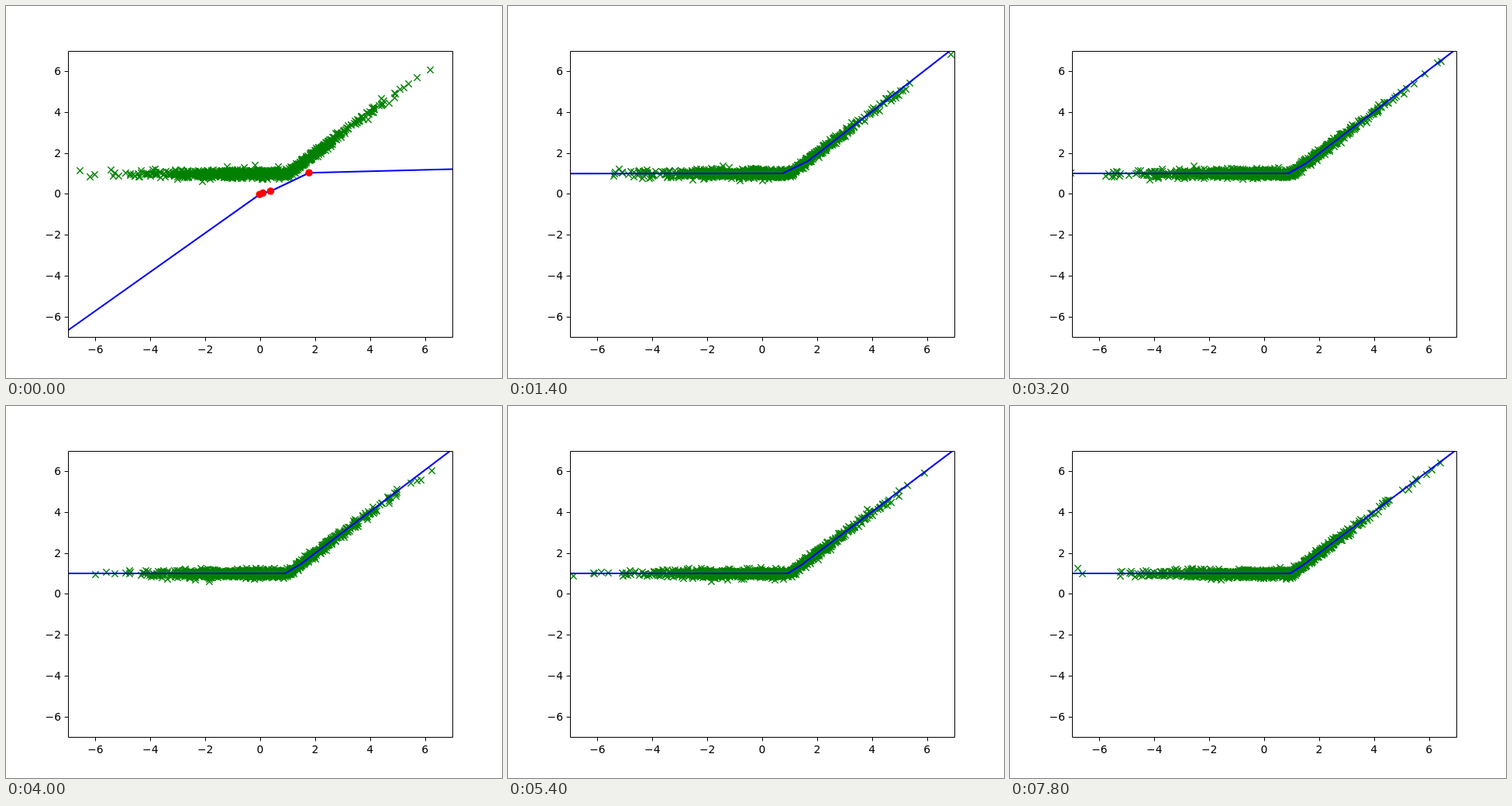
Write an HTML page with a canvas that moves like this. It is 640 px wide and 480 px high and loops after 8000 ms.

```html
<!DOCTYPE html>
<html lang="en">
<head>
<meta charset="utf-8">
<title>Piecewise linear fit</title>
<style>
  html, body { margin: 0; width: 100%; height: 100%; overflow: hidden; background: #fff; }
  canvas, svg { position: absolute; left: 0; top: 0; width: 640px; height: 480px; }
  text { font: 13.89px "DejaVu Sans", sans-serif; }
  path { stroke: #000; stroke-width: 1; fill: none; }
</style>
</head>
<body>
<canvas id="plot" width="640" height="480"></canvas>
<svg id="axes" viewBox="0 0 640 480"></svg>
<script>
const STEP = 200, STEPS = 40, SAMPLES = 1000;
const sx = x => 328 + x * 35.43;
const sy = y => 242.4 - y * 26.4;
const snap = v => Math.round(v) + 0.5;
const ctx = document.getElementById('plot').getContext('2d');

// Vertices of the untrained fit
const START = [[-7, -6.67], [-0.02, -0.03], [0.1, 0.04], [0.38, 0.13], [1.78, 1.03], [7, 1.21]];

// Seeded standard normal numbers
function normalSource(seed) {
  let s = seed;
  const uniform = () => {
    s = (s + 0x6D2B79F5) | 0;
    let t = Math.imul(s ^ (s >>> 15), 1 | s);
    t = (t + Math.imul(t ^ (t >>> 7), 61 | t)) ^ t;
    return ((t ^ (t >>> 14)) >>> 0) / 4294967296;
  };
  return () => Math.sqrt(-2 * Math.log(1 - uniform())) * Math.cos(2 * Math.PI * uniform());
}

// Noisy samples of max(1, x)
function samples(step) {
  const normal = normalSource(step * 7919 + 17);
  return Array.from({ length: SAMPLES }, () => {
    const x = 2 * normal();
    return [x, Math.max(1, x) + 0.1 * normal()];
  });
}

// The fit settles fast at first, then its two bends slowly close in on x = 1
function fit(step) {
  const fast = 0.4 ** step;
  const slow = Math.exp((7 - step) / 9);
  const bend = 1.42 + 0.26 * slow;
  const settled = [
    [-7, 1], [0, 1], [0.1, 1],
    [0.95 - 0.2 * slow, 1],
    [bend, bend - 0.01 - 0.06 * slow],
    [7, 7.04 + 0.13 * slow]
  ];
  return settled.map((p, i) => p.map((v, j) => v + (START[i][j] - v) * fast));
}

function drawCross([x, y]) {
  const cx = snap(sx(x)), cy = snap(sy(y)), r = 4.17;
  ctx.beginPath();
  ctx.moveTo(cx - r, cy - r);
  ctx.lineTo(cx + r, cy + r);
  ctx.moveTo(cx - r, cy + r);
  ctx.lineTo(cx + r, cy - r);
  ctx.stroke();
}

function drawKnot([x, y]) {
  ctx.beginPath();
  ctx.arc(sx(x), sy(y), 4.8, 0, 2 * Math.PI);
  ctx.fill();
}

function draw(step) {
  ctx.clearRect(0, 0, 640, 480);
  ctx.save();
  ctx.beginPath();
  ctx.rect(80, 58, 496, 369);
  ctx.clip();

  ctx.strokeStyle = '#008000';
  ctx.lineWidth = 1.39;
  samples(step).forEach(drawCross);

  ctx.strokeStyle = '#0000ff';
  ctx.lineWidth = 2.08;
  ctx.lineJoin = 'round';
  ctx.beginPath();
  fit(step).forEach(([x, y]) => ctx.lineTo(sx(x), sy(y)));
  ctx.stroke();

  if (step === 0) {
    ctx.fillStyle = '#ff0000';
    START.slice(1, -1).forEach(drawKnot);
  }
  ctx.restore();
}

function buildAxes() {
  let path = 'M80.5 58.5H576.5V427.5H80.5Z', labels = '';
  for (let v = -6; v <= 6; v += 2) {
    const label = String(v).replace('-', '\u2212');
    path += `M${snap(sx(v))} 427.5v4.86M80.5 ${snap(sy(v))}h-4.86`;
    labels += `<text x="${sx(v)}" y="448" text-anchor="middle">${label}</text>` +
      `<text x="71" y="${Math.round(sy(v) + 5)}" text-anchor="end">${label}</text>`;
  }
  document.getElementById('axes').innerHTML = `<path d="${path}"/>${labels}`;
}

buildAxes();
const began = performance.now();
let shown = -1;
function tick() {
  const step = Math.floor((performance.now() - began) / STEP) % STEPS;
  if (step !== shown) draw(shown = step);
  requestAnimationFrame(tick);
}
tick();
</script>
</body>
</html>
```
